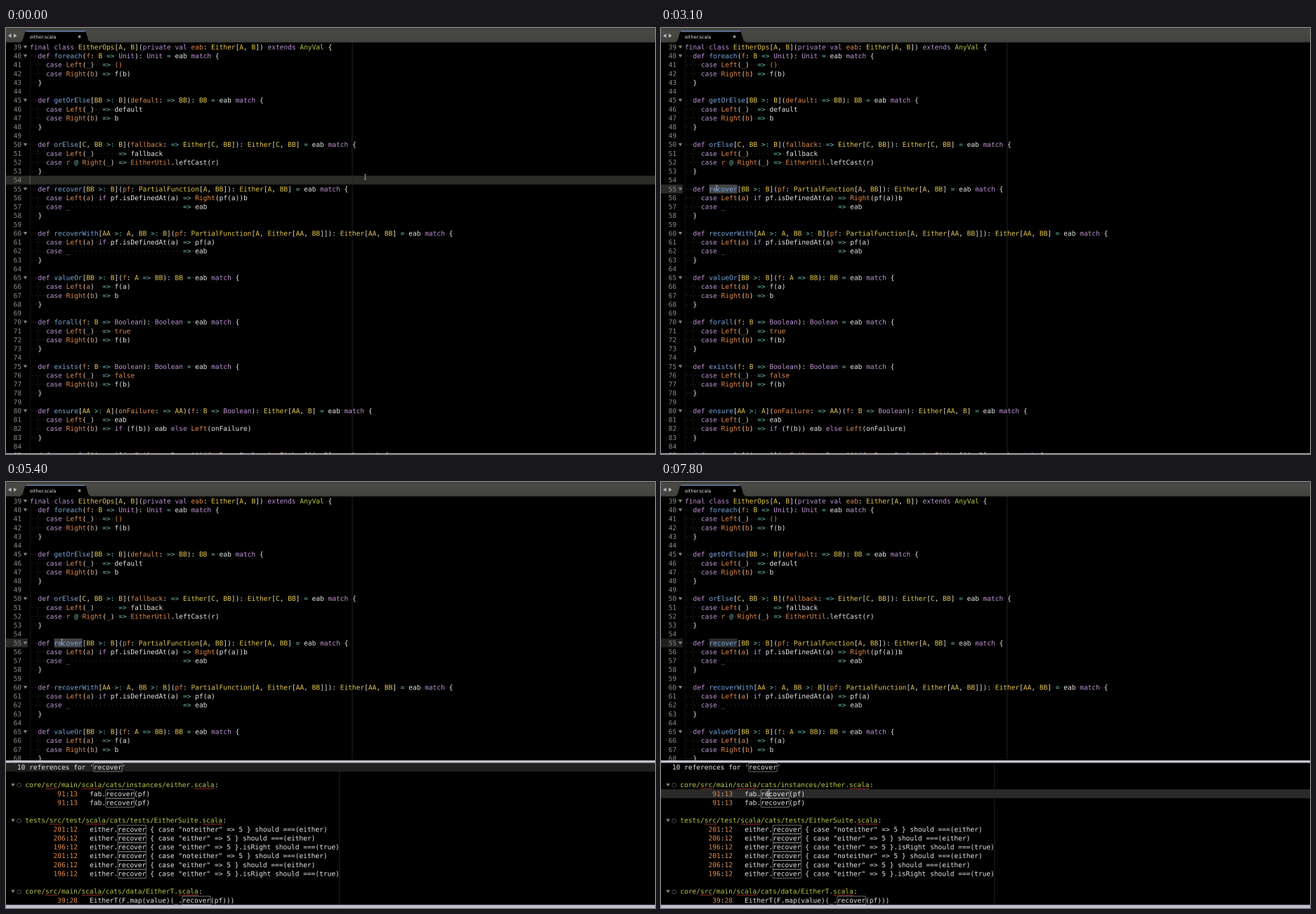
An HTML page with a canvas that plays this animation: 924x606 px, repeating every 8000 ms.

```html
<!DOCTYPE html>
<html lang="en">
<head>
<meta charset="utf-8">
<title>Find references</title>
<style>
html, body { margin: 0; width: 100%; height: 100%; overflow: hidden; background: #000; }
canvas { display: block; width: 924px; height: 606px; }
</style>
</head>
<body>
<canvas id="stage" width="1848" height="1212"></canvas>
<script>
const ctx = document.getElementById('stage').getContext('2d');
const W = 924, H = 606, LOOP = 8000, STEP = 100;
const CHAR = 5.737, ROW = 12.622, SPLIT = 396;
const CODE_X = 34, CODE_Y = 27, FIRST = 39;
const LIST_X = 15.9, LIST_Y = 405.6;
const MONO = '9.53px "DejaVu Sans Mono", monospace';
const FG = '#e6e6e6', ORANGE = '#e08b4b', YELLOW = '#e5c850', GREEN = '#b9ca4a',
  AQUA = '#70c0b1', BLUE = '#7aa6da', PURPLE = '#bd94d3', ACTIVE = '#2a2a29', BAR = '#c1c1cd';

const code = `final class EitherOps[A, B](private val eab: Either[A, B]) extends AnyVal {
  def foreach(f: B => Unit): Unit = eab match {
    case Left(_)  => ()
    case Right(b) => f(b)
  }

  def getOrElse[BB >: B](default: => BB): BB = eab match {
    case Left(_)  => default
    case Right(b) => b
  }

  def orElse[C, BB >: B](fallback: => Either[C, BB]): Either[C, BB] = eab match {
    case Left(_)      => fallback
    case r @ Right(_) => EitherUtil.leftCast(r)
  }

  def recover[BB >: B](pf: PartialFunction[A, BB]): Either[A, BB] = eab match {
    case Left(a) if pf.isDefinedAt(a) => Right(pf(a))b
    case _                            => eab
  }

  def recoverWith[AA >: A, BB >: B](pf: PartialFunction[A, Either[AA, BB]]): Either[AA, BB] = eab match {
    case Left(a) if pf.isDefinedAt(a) => pf(a)
    case _                            => eab
  }

  def valueOr[BB >: B](f: A => BB): BB = eab match {
    case Left(a)  => f(a)
    case Right(b) => b
  }

  def forall(f: B => Boolean): Boolean = eab match {
    case Left(_)  => true
    case Right(b) => f(b)
  }

  def exists(f: B => Boolean): Boolean = eab match {
    case Left(_)  => false
    case Right(b) => f(b)
  }

  def ensure[AA >: A](onFailure: => AA)(f: B => Boolean): Either[AA, B] = eab match {
    case Left(_)  => eab
    case Right(b) => if (f(b)) eab else Left(onFailure)
  }

  def ensureOr[AA >: A](onFailure: B => AA)(f: B => Boolean): Either[AA, B] = eab match {`.split('\n');

const suite = `         201:12   either.recover { case "noteither" => 5 } should ===(either)
         206:12   either.recover { case "either" => 5 } should ===(either)
         196:12   either.recover { case "either" => 5 }.isRight should ===(true)`;
const results = `10 references for 'recover'

  core/src/main/scala/cats/instances/either.scala:
          91:13   fab.recover(pf)
          91:13   fab.recover(pf)

  tests/src/test/scala/cats/tests/EitherSuite.scala:
${suite}
${suite}

  core/src/main/scala/cats/data/EitherT.scala:
          39:28   EitherT(F.map(value)(_.recover(pf)))`.split('\n');

// One capture group per colour
const codeRules = [/(\b(?:final|class|private|val|extends|def|match|case|if|else|Unit|Boolean)\b)|((?<=def )\w+)|(=>|>:|=|@)|(\w+(?=:)|\b(?:Left|Right|EitherUtil|true|false)\b|(?<=case (?:r @ )?(?:Left|Right)\()\w|(?<=case )\w\b|(?<==> )\(\))|(AnyVal)|([A-Z]\w*)|([^\sA-Za-z_]|\w+)/g,
  [PURPLE, BLUE, AQUA, ORANGE, GREEN, YELLOW, FG]];
const listRules = [/(^ +\w+\/[^:]+)|((?<=^ +)\d+|(?<=^ +\d+:)\d+)|(:|\S+)/g, [GREEN, ORANGE, FG]];

// Pointer stops: time, x, y
const path = [[400, 511.5, 212], [800, 224.5, 267], [1000, 224.5, 267], [1400, 91.5, 227.5],
  [1500, 91.5, 227.5], [1800, 79.5, 227.5], [6000, 79.5, 227.5], [6300, 56, 300],
  [6900, 190.5, 465], [7000, 190.5, 465], [7600, 151.5, 443.5]];

function rect(color, x, y, w, h) {
  ctx.fillStyle = color;
  ctx.fillRect(x, y, w, h);
}

function poly(color, ...points) {
  ctx.fillStyle = color;
  ctx.beginPath();
  points.forEach(p => ctx.lineTo(...p));
  ctx.fill();
}

function fold(x, y) {
  poly('#80807c', [x - 2.8, y - 2], [x + 2.8, y - 2], [x, y + 2.4]);
}

function drawLine(line, x, y, [pattern, colors]) {
  for (const m of line.matchAll(pattern)) {
    ctx.fillStyle = colors[m.slice(1).findIndex(g => g !== undefined)];
    ctx.fillText(m[0], x + m.index * CHAR, y + 3.4);
  }
}

const codeRow = n => CODE_Y + (n - FIRST) * ROW;

function caret(x, y, alpha) {
  ctx.globalAlpha = alpha;
  rect('#c8c8c8', x - 0.3, y - 6.3, 1, ROW);
  ctx.globalAlpha = 1;
}

function drawTabs() {
  const shade = ctx.createLinearGradient(0, 0, 0, 20.5);
  shade.addColorStop(0, '#393a36');
  shade.addColorStop(0.12, '#4a4b47');
  shade.addColorStop(1, '#41423e');
  rect(shade, 0, 0, W, 20.5);
  poly('#000', [20, 20.5], [23.5, 18], [27, 6], [29, 4.2], [112, 4.2], [114, 6], [117.5, 18], [121, 20.5]);
  rect('#7c9bd0', 28.5, 4.2, 84, 1.2);
  poly('#b8b8b4', [7.5, 8], [7.5, 14], [3, 11]);
  poly('#b8b8b4', [11, 8], [11, 14], [15.5, 11]);
  ctx.font = '6.5px "DejaVu Sans", sans-serif';
  ctx.fillStyle = '#e6e6e4';
  ctx.fillText('either.scala', 34, 14.8);
  ctx.fillStyle = '#858583';
  ctx.beginPath();
  ctx.arc(104.6, 12.4, 2, 0, 7);
  ctx.fill();
}

function drawCode(t) {
  const line = t < 2000 ? 54 : 55;
  const y = codeRow(line);
  const selected = t >= 2100, blurred = t >= 7800;
  rect(blurred ? '#1e1e1d' : ACTIVE, 0, y - 6.3, selected ? 31 : W, ROW);
  if (selected) rect(blurred ? '#2b2c2e' : '#424447', CODE_X + 6 * CHAR, y - 6.3, 7 * CHAR, ROW);
  rect('#222', CODE_X + 80 * CHAR - 0.5, 20.5, 1, H);

  ctx.font = MONO;
  code.forEach((text, i) => {
    const rowY = codeRow(FIRST + i);
    ctx.fillStyle = '#8a8a87';
    ctx.fillText(FIRST + i, 10.6, rowY + 3.4);
    if (text.endsWith('{')) fold(27.5, rowY);
    if (i) rect('#1c1c1c', CODE_X, rowY - 6.3, 0.7, ROW);
    if (text.startsWith('    ')) rect('#1c1c1c', CODE_X + 2 * CHAR, rowY - 6.3, 0.7, ROW);
    for (const m of text.matchAll(/ /g)) rect('#424242', CODE_X + (m.index + 0.5) * CHAR - 0.5, rowY - 0.3, 1, 1);
    drawLine(text, CODE_X, rowY, codeRules);
  });

  if (blurred) return;
  const peak = selected ? 2420 : 330;
  const settled = t >= 2000 && t < 2420;
  const alpha = settled ? 1 : 0.5 + 0.5 * Math.cos((t - peak) / 1160 * 2 * Math.PI);
  caret(CODE_X + (selected ? 13 : t >= 2000 ? 8 : 0) * CHAR, y, alpha);
}

function drawResults(t) {
  const focused = t >= 7800;
  rect('#000', 0, SPLIT, W, H - SPLIT);
  const activeY = LIST_Y + (focused ? 3 : 0) * ROW;
  rect(focused ? ACTIVE : '#20201f', 0, activeY - 6.3, W, ROW);
  rect('#222', LIST_X + 80 * CHAR - 0.5, SPLIT, 1, H);
  ctx.font = MONO;
  ctx.lineWidth = 0.7;
  results.forEach((text, i) => {
    const y = LIST_Y + i * ROW;
    drawLine(text, LIST_X, y, listRules);
    if (text.includes('/')) {
      fold(10, y);
      ctx.strokeStyle = '#b0b0b0';
      ctx.setLineDash([1.3, 1.1]);
      ctx.beginPath();
      ctx.arc(18.6, y + 0.6, 2.8, 0, 7);
      ctx.stroke();
      ctx.setLineDash([]);
      for (const m of text.matchAll(/src|scala/g))
        rect('#a82c2c', LIST_X + m.index * CHAR, y + 5, m[0].length * CHAR, 0.9);
    }
    const at = text.indexOf('recover');
    if (at >= 0) {
      ctx.strokeStyle = '#909090';
      ctx.beginPath();
      ctx.roundRect(LIST_X + at * CHAR - 0.2, y - 5.8, 7 * CHAR + 0.4, ROW - 0.4, 1.5);
      ctx.stroke();
    }
  });
  if (focused) caret(LIST_X + 24 * CHAR, activeY, 1);
  rect(BAR, 0, SPLIT, W, 3.5);
  rect(BAR, 0, 601.5, W, 4.5);
}

function drawPointer(t) {
  const next = path.findIndex(p => p[0] > t);
  const b = path[next < 0 ? path.length - 1 : next];
  const a = next < 0 ? b : path[Math.max(0, next - 1)];
  const u = a === b ? 0 : (t - a[0]) / (b[0] - a[0]);
  const k = u * u * (3 - 2 * u);
  const x = a[1] + (b[1] - a[1]) * k, y = a[2] + (b[2] - a[2]) * k;
  rect('#c8c8c8', x - 0.35, y - 3.5, 0.7, 7);
  rect('#c8c8c8', x - 1.5, y - 3.8, 3, 0.6);
  rect('#c8c8c8', x - 1.5, y + 3.2, 3, 0.6);
}

function draw(now) {
  const t = Math.floor(now % LOOP / STEP) * STEP;
  rect('#000', 0, 0, W, H);
  drawCode(t);
  drawTabs();
  rect('#b5a9b4', 0, 604.8, W, 1.2);
  if (t >= 5400) drawResults(t);
  drawPointer(t);
}

// Drawn at double size so that text sits at fractional positions
ctx.scale(2, 2);
ctx.textRendering = 'geometricPrecision';
const start = performance.now();
function tick() {
  draw(performance.now() - start);
  requestAnimationFrame(tick);
}
tick();
</script>
</body>
</html>
```
